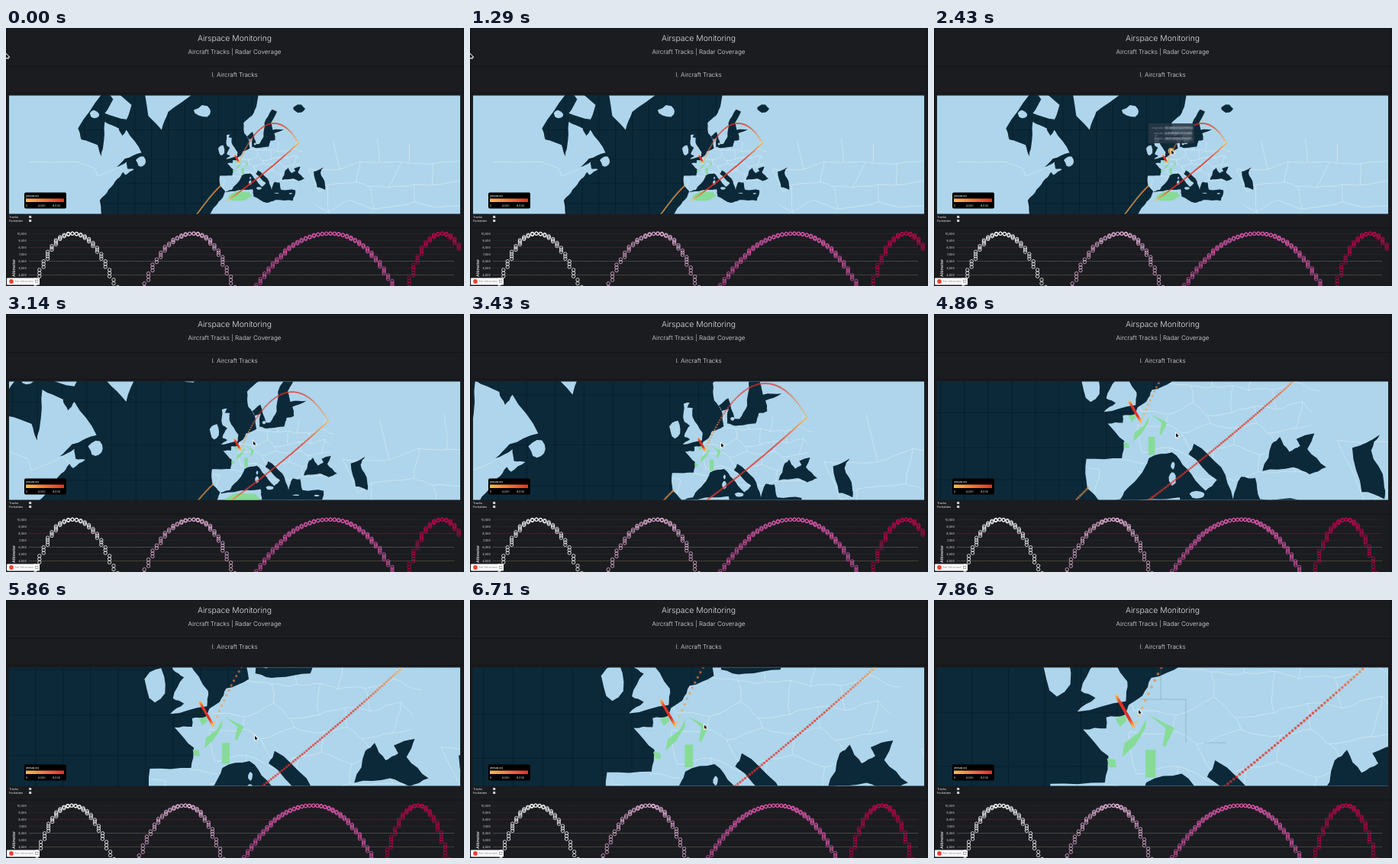
These frames come from a looping animation (600x338 px, 8 s). An HTML page with a canvas:

```html
<!DOCTYPE html>
<html lang="en">
<head>
<meta charset="utf-8">
<title>Airspace Monitoring</title>
<style>
  html, body { margin: 0; height: 100%; overflow: hidden; background: #1b1c20; }
  canvas { display: block; width: 100vw; height: 100vh; }
</style>
</head>
<body>
<canvas id="stage"></canvas>
<script>
const LOOP = 8000, STEP = 1000 / 7;
const WATER = '#0c2939', LAND = '#aed5eb';
const canvas = document.getElementById('stage');
const ctx = canvas.getContext('2d');
const dpr = window.devicePixelRatio || 1;
canvas.width = 600 * dpr;
canvas.height = 338 * dpr;

let seed = 7;
function noise() {
  seed = (seed * 16807) % 2147483647;
  return seed / 2147483647 - .5;
}
const mercator = lat => Math.log(Math.tan(Math.PI / 4 + lat * Math.PI / 360)) * 180 / Math.PI;

function pairs(flat, toMap = v => v) {
  return Array.from({ length: flat.length / 2 }, (_, i) => [flat[2 * i], toMap(flat[2 * i + 1])]);
}
// Midpoint displacement turns a few key points into a ragged line.
function ragged(points, levels = 2) {
  if (!levels) return points;
  const out = [points[0]];
  points.slice(1).forEach((b, i) => {
    const a = points[i], dx = b[0] - a[0], dy = b[1] - a[1];
    const shift = Math.min(.18, .7 / Math.hypot(dx, dy)) * noise();
    out.push([(a[0] + b[0]) / 2 - dy * shift, (a[1] + b[1]) / 2 + dx * shift], b);
  });
  return ragged(out, levels - 1);
}
function coast(...flat) {
  const points = pairs(flat, mercator);
  return ragged([...points, points[0]]);
}
function blob(lon, lat, w, h) {
  return Array.from({ length: 11 }, (_, i) => {
    const a = i / 11 * 2 * Math.PI, r = 1 + noise() * .4;
    return [lon + w * r * Math.cos(a), mercator(lat + h * r * Math.sin(a))];
  });
}

// Key points are longitude, latitude.
const mainland = coast(20,78, 13,67, 10,64, 5,62, 5.5,59, 7,58, 8.1,57, 8.8,54, 4.7,53, 3.5,51.5, 1.6,50.7,
  1,49.8, -1.5,49.6, -1.5,48.6, -4.7,48.5, -1.2,46, -1.7,43.4, -9.2,43.3, -9,38.6, -6,36.2, -6.9,34,
  -9.8,31, -13,27.6, -17,20, 160,20, 160,78);
const lands = [
  mainland,
  coast(-140,78, -80,69, -94,60.5, -92,57, -82.3,55.2, -80,51.2, -79,54.6, -78,62.4, -69.6,60.5, -67.6,58.2,
    -65,60, -56,52.5, -66,50.2, -71,46.9, -65,49, -64.5,46.3, -60.5,46, -65.5,43.6, -67,44.8, -70.3,42,
    -75.7,37, -81,31.5, -80,20, -140,20),
  coast(-56,74, -52,64, -44,60, -40,65, -24,69.5, -20,74),
  coast(-88,74, -62,66.7, -65,63, -78,64.6, -73,68),
  coast(-5.5,50.1, 1.2,51, 1.4,52.7, -2,55.8, -2,57.6, -4,57.7, -3,58.6, -5.2,58.4, -5,55, -3,54.2,
    -5,51.9, -3,51.3),
  blob(-8, 53.4, 1.9, 1.8), blob(-19, 65, 5.2, 1.4), blob(-56, 49, 3, 2.1), blob(-84, 64.4, 2.8, .9)];
const seas = [
  coast(7,58, 10.4,59.4, 12.6,55.5, 14.3,55.5, 17,58, 17.5,62, 22,65.6, 25,65, 21.4,62, 22.5,60, 29,60.2,
    23.4,59, 24,57, 21,56.6, 20,54.6, 14,54.2, 10,54.6, 10.6,57.4, 8.1,57),
  coast(-5.8,36, -2,36.8, 0,39, 3.2,42, 4,43.4, 8.9,44.3, 12,41.8, 16,38.2, 18.4,40, 12.4,44, 13.5,45.6,
    19.3,42, 21.8,36.8, 23.5,40.5, 26.5,40.3, 27.5,36.8, 36,36.6, 34.5,31.4, 24,31.8, 19,30.4, 11,33.6,
    10.5,37.1, 5,36.8, -5.4,35.7),
  coast(28,41.4, 30,45.6, 31.7,46.6, 33.7,44.4, 36,45.3, 35.2,46.3, 39,47.1, 37.5,44.8, 41.5,42, 38,40.9,
    34.5,42),
  coast(47,45, 52.8,46.9, 51,44.6, 53.7,39.5, 53.8,36.8, 49,38),
  blob(38, 65.8, 3.5, .9)];
const islands = [blob(9, 40.1, .7, 1), blob(9.1, 42.2, .4, .6), blob(14.2, 37.5, 1.5, .6),
  blob(24.8, 35.2, 1.3, .2), blob(33.2, 35, 1, .3), blob(11.8, 55.5, .7, .4)];

// Country borders: a jittered honeycomb, cut off at the coast.
function borderNet(left, bottom, columns, rows, size) {
  const nodes = Array.from({ length: columns }, (_, i) => Array.from({ length: rows }, (_, j) =>
    [left + (i + noise() * .7) * size, bottom + (j + noise() * .7) * size]));
  const edges = [];
  for (let i = 0; i < columns - 1; i++)
    for (let j = 0; j < rows - 1; j++) {
      edges.push(ragged([nodes[i][j], nodes[i + 1][j]]));
      if ((i + j) % 2) edges.push(ragged([nodes[i][j], nodes[i][j + 1]]));
    }
  return edges;
}
const borders = [...borderNet(3, 45, 9, 6, 4.6), ...borderNet(46, 30, 8, 4, 12.5),
  ragged(pairs([-1.9, 47.9, 3.1, 47.2])), ragged(pairs([-8.8, 46.2, -6.4, 45.9, -7.4, 40]))];
const americanBorder = ragged(pairs([-123,49, -95,49, -84,46.3, -82.5,43, -75,45, -70,47, -67,45], mercator), 1);

// Tracks and zones use longitude and projected latitude.
const zones = [
  [-.3,57.1, 1.1,57.6, 1.3,56.8, .4,56],
  [4,57.1, 3.9,55.8, 2.5,53.5, .7,51.8, 1,53.7, 3.1,55.3],
  [4.4,57.6, 7.9,55.8, 6.6,53.2, 6.3,53.5, 6.7,55.8],
  [3.9,52.8, 5.3,52.8, 5.3,49, 3.9,49],
  [-1.4,51.6, -.3,51.5, -.1,50.4, -1.1,50.4],
  [-4.2,36, .3,38.5, 8.3,38.2, 10.3,36, 5.3,33, -2.6,33.3]].map(flat => pairs(flat));
const hill = u => Math.sin(Math.PI * u) * 1.4;
const tracks = [
  { path: [2.6,56.6, 12.3,80.5, 26.3,88, 37.9,67.6], count: 70, alpha: .7, climb: hill },
  { path: [37.9,67.6, 23.8,54.6, 9.6,43.1, -4.6,33.3], count: 105, alpha: .75, climb: hill },
  { path: [-8.8,42, -13.6,37.5, -18.6,31, -23.6,24], count: 42, alpha: .65, climb: u => .3 - u * .2 },
  { path: [-.1,60.2, .7,58.8, 1.5,57.4, 2.3,56], count: 42, alpha: 1, climb: hill }];

// [time, pixels per degree, x and y of the anchor in London]
const anchor = [-.1, 60.2];
const cameraKeys = [[0, 2.19, 300, 167], [2570, 2.19, 300, 167], [3430, 3.75, 299, 163], [3710, 3.75, 299, 163],
  [4140, 4.25, 281, 149], [4860, 6.2, 256, 115], [5860, 7.2, 254, 134], [6430, 7.2, 254, 134], [7570, 9.5, 239, 126]];
const cursorKeys = [[0, 0, 34], [1500, 0, 34], [2430, 311, 160], [3430, 329, 169],
  [4140, 311, 153], [4860, 317, 156], [5860, 326, 178], [6430, 320, 170], [7570, 268, 144]];
const arcs = [
  { peak: 87, left: 47, right: 54, count: 62, color: '#f4f4f4' },
  { peak: 246, left: 63, right: 49, count: 64, color: '#dfadd2' },
  { peak: 425, left: 92, right: 79, count: 112, color: '#d655a8' },
  { peak: 571.5, left: 43, right: 39, count: 74, color: '#b3084b' }];

function keyed(keys, t) {
  const next = keys.findIndex(k => k[0] > t);
  if (next < 0) return keys.at(-1).slice(1);
  const a = keys[next - 1], b = keys[next], u = (t - a[0]) / (b[0] - a[0]);
  return a.slice(1).map((v, i) => v + (b[i + 1] - v) * u);
}

let camera;
const place = ([lon, m]) => [camera[1] + (lon - anchor[0]) * camera[0], camera[2] - (m - anchor[1]) * camera[0]];

function trace(points) {
  ctx.beginPath();
  points.forEach(p => ctx.lineTo(...place(p)));
}
function fillShapes(shapes, color) {
  ctx.fillStyle = color;
  for (const shape of shapes) {
    trace(shape);
    ctx.fill();
  }
}
function rect(x, y, w, h, color, radius = 0) {
  ctx.fillStyle = color;
  ctx.beginPath();
  ctx.roundRect(x, y, w, h, radius);
  ctx.fill();
}
function line(color, width, ...flat) {
  ctx.strokeStyle = color;
  ctx.lineWidth = width;
  ctx.beginPath();
  pairs(flat).forEach(p => ctx.lineTo(...p));
  ctx.stroke();
}
function circle(x, y, r) {
  ctx.beginPath();
  ctx.arc(x, y, r, 0, 7);
}
function dot(x, y, r, color) {
  circle(x, y, r);
  ctx.fillStyle = color;
  ctx.fill();
}
function text(label, x, y, size, { color = '#e4e4e6', align = 'left', weight = 400 } = {}) {
  ctx.font = `${weight} ${size}px Inter, sans-serif`;
  ctx.textRendering = 'geometricPrecision';
  ctx.textAlign = align;
  ctx.fillStyle = color;
  ctx.fillText(label, x, y);
}
function altitudeColor(level) {
  const u = Math.min(1, level);
  return `rgb(${250 - 20 * u}, ${188 - 140 * u}, ${80 - 42 * u})`;
}

function drawTrack({ path: p, count, alpha, climb }) {
  const radius = .75 + camera[0] * .12;
  ctx.globalAlpha = alpha;
  for (let i = 0; i <= count; i++) {
    const u = i / count, v = 1 - u;
    const mix = k => v ** 3 * p[k] + 3 * v * v * u * p[k + 2] + 3 * v * u * u * p[k + 4] + u ** 3 * p[k + 6];
    dot(...place([mix(0), mix(1)]), radius, altitudeColor(climb(u)));
  }
  ctx.globalAlpha = 1;
}

function drawGrid() {
  const gap = camera[0] > 5 ? 5 : 10;
  for (let d = -140; d <= 140; d += gap) {
    const [x, y] = place([d, mercator(Math.abs(d) / 2)]);
    line('#081d2a', .8, x, 88, x, 244);
  }
  for (let d = 20; d <= 75; d += gap) {
    const y = place([0, mercator(d)])[1];
    line('#081d2a', .8, 4, y, 595, y);
  }
}

function drawBorders() {
  ctx.strokeStyle = 'rgba(232, 243, 249, .75)';
  ctx.lineWidth = .6;
  trace(americanBorder);
  ctx.stroke();
  ctx.save();
  trace(mainland);
  ctx.clip();
  for (const border of borders) {
    trace(border);
    ctx.stroke();
  }
  ctx.restore();
}

function drawMap(t) {
  ctx.save();
  ctx.beginPath();
  ctx.rect(4, 88.5, 591, 155);
  ctx.clip();
  rect(4, 88, 591, 156, WATER);
  drawGrid();
  fillShapes(lands, LAND);
  drawBorders();
  fillShapes(seas, WATER);
  fillShapes(islands, LAND);
  fillShapes(zones, '#86dc97');
  tracks.forEach(drawTrack);
  if (t >= 7560) {
    const seam = 'rgba(105, 125, 130, .6)';
    line(seam, .6, 297, 92, 297, 130);
    line(seam, .6, 270, 130, 330, 130, 330, 187);
    line(seam, .6, 354, 187, 383, 187);
  }
  ctx.restore();
}

function drawLegend() {
  rect(24, 215.5, 55, 21, '#000', 2);
  text('Altitude (m)', 26.3, 220.8, 2.9, { weight: 700 });
  const ramp = ctx.createLinearGradient(26, 0, 76, 0);
  [0, .5, 1].forEach(u => ramp.addColorStop(u, altitudeColor(u)));
  rect(26, 223.5, 50, 4.5, ramp);
  text('0', 26, 233.5, 3.7);
  text('4,000', 46.5, 233.5, 3.7, { align: 'center' });
  text('8,000', 66, 233.5, 3.7, { align: 'center' });
}

function drawTooltip() {
  rect(281, 125, 60, 26, 'rgba(42, 55, 70, .88)', 1);
  [['longitude', '53.306843520786604'], ['latitude', '6.0198056341720983'], ['altitude', '2637.0528103794127']]
    .forEach(([name, value], i) => {
      const y = 132.3 + i * 7;
      rect(301, y - 3.4, 38, 4.6, 'rgba(100, 115, 130, .35)', 1);
      text(name, 300, y, 3.4, { color: '#7d8b98', align: 'right' });
      text(value, 303, y, 3.4, { color: '#c3ccd4' });
    });
  dot(310.5, 161, 4, '#c99a4c');
}

function drawChart(t) {
  const chartX = t < 3855 ? x => x : x => 235 + (x - 246) * .937;
  const strongLines = { 8: '#7c2742', 6: '#88888c', 4: '#85795a' };
  for (let k = 10; k >= 4; k--) {
    const y = 269.5 + (10 - k) * 9;
    text(`${k},000`, 27, y + 1.3, 3.9, { align: 'right' });
    ctx.setLineDash([1, strongLines[k] ? .5 : 1]);
    line(strongLines[k] || '#41343d', .6, 30, y, 587, y);
    ctx.setLineDash([]);
  }
  ctx.lineWidth = .85;
  for (const { peak, left, right, count, color } of arcs) {
    ctx.strokeStyle = color;
    for (let i = 0; i <= count; i++) {
      const u = i / count * 2.1 - 1.05;
      const x = chartX(peak + Math.round(u * (u < 0 ? left : right) / 5.4) * 5.4);
      if (x > 594) continue;
      circle(x, 269.3 + 63 * Math.abs(u) ** 2.2, 2.2);
      ctx.stroke();
    }
  }
  ctx.save();
  ctx.translate(12, 326);
  ctx.rotate(-Math.PI / 2);
  text('Altimeter', 0, 0, 5.2, { weight: 600 });
  ctx.restore();
}

function drawPage() {
  rect(0, 0, 600, 338, '#1b1c20');
  for (const y of [.5, 50.5, 85.5, 262]) line('#121316', 1, 0, y, 600, y);
  for (const x of [1, 598.5]) line('#121316', 1, x, 0, x, 338);
  const heading = { align: 'center', weight: 300 };
  text('Airspace Monitoring', 299.5, 17, 10.4, heading);
  text('Aircraft Tracks | Radar Coverage', 299.5, 34.2, 8.1, heading);
  text('I. Aircraft Tracks', 299.5, 64.2, 8, heading);
  [['Tracks', 249], ['Forbidden', 254]].forEach(([label, y]) => {
    text(label, 4, y, 3.8);
    rect(30.2, y - 3.1, 3, 3, '#f0f0f0', .5);
    line('#333', .5, 30.8, y - 1.6, 31.5, y - .9, 32.7, y - 2.4);
  });
}

function drawExitHint() {
  rect(1, 327.5, 43, 9, '#fff', 1);
  dot(7, 332, 2.9, '#ea4335');
  text('Exit full screen', 11.5, 333.3, 3.5, { color: '#77797d' });
  ctx.strokeStyle = '#77797d';
  ctx.lineWidth = .6;
  ctx.strokeRect(38.6, 330.2, 3.4, 3.4);
}

function drawCursor(x, y) {
  ctx.beginPath();
  pairs([0,0, 0,5.4, 1.3,4.3, 2.2,6, 3,5.6, 2.2,3.9, 3.8,3.8]).forEach(([a, b]) => ctx.lineTo(x + a, y + b));
  ctx.closePath();
  ctx.strokeStyle = '#fff';
  ctx.lineWidth = 1.6;
  ctx.stroke();
  ctx.fillStyle = '#111';
  ctx.fill();
}

function draw(now) {
  const t = Math.floor((now % LOOP + 5) / STEP) * STEP + 2;
  ctx.setTransform(dpr, 0, 0, dpr, 0, 0);
  camera = keyed(cameraKeys, t);
  drawPage();
  drawMap(t);
  drawLegend();
  drawChart(t);
  drawExitHint();
  if (t > 2280 && t < 2650) drawTooltip();
  drawCursor(...keyed(cursorKeys, t));
}

const start = performance.now();
function tick() {
  draw(performance.now() - start);
  requestAnimationFrame(tick);
}
tick();
</script>
</body>
</html>
```
